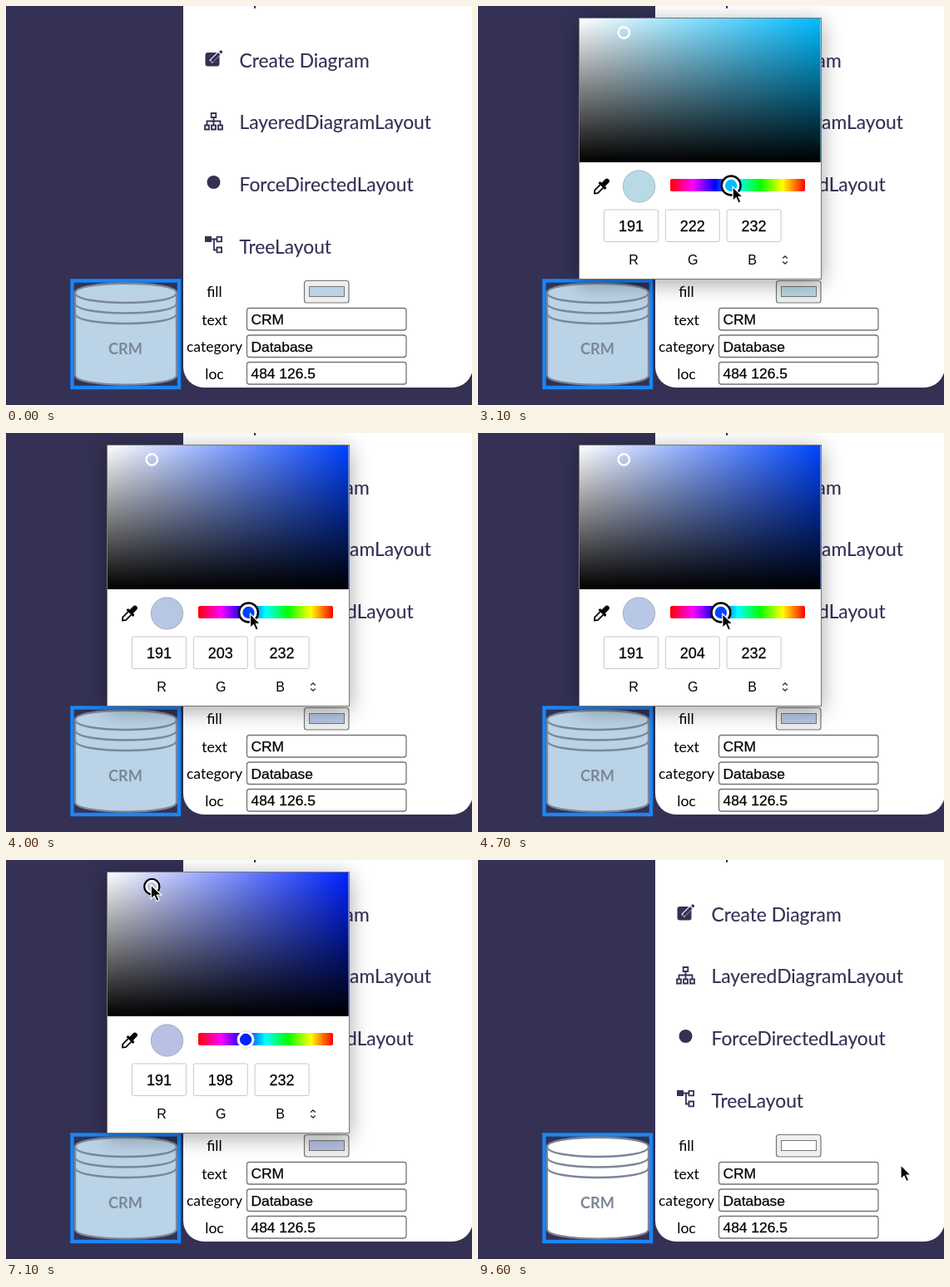
These frames come from a looping animation (560 by 480 pixels, 9900 ms). An HTML page:

```html
<!DOCTYPE html>
<html lang="en">
<head>
<meta charset="utf-8">
<title>Fill colour picker</title>
<style>
  html, body { margin: 0; width: 100%; height: 100%; overflow: hidden; background: #343155; }
  svg { display: block; width: 560px; height: 480px; }
  .menu { font: 22.8px Lato, sans-serif; fill: #343155; stroke: #343155; stroke-width: .15; }
  .label { font: 17.6px Lato, sans-serif; text-anchor: middle; }
  .value, .number { font: 17.4px "Liberation Sans", Arial, sans-serif; stroke: #000; stroke-width: .25; }
  .number { font-size: 18px; text-anchor: middle; }
  .channel { font: 16px "Liberation Sans", Arial, sans-serif; text-anchor: middle; }
  .node { font: bold 18.2px Lato, sans-serif; text-anchor: middle; fill: #7b8798; }
  .field { fill: #fff; stroke: #767676; stroke-width: 1.3; }
  .line { fill: none; stroke: #343155; stroke-width: 1.8; }
  .icon { fill: #343155; }
  #picker { filter: drop-shadow(0 5px 13px rgba(0, 0, 0, .35)); }
</style>
</head>
<body>
<svg viewBox="0 0 560 480">
  <defs>
    <linearGradient id="white"><stop stop-color="#fff"/><stop offset="1" stop-color="#fff" stop-opacity="0"/></linearGradient>
    <linearGradient id="black" x2="0" y2="1"><stop stop-opacity="0"/><stop offset="1"/></linearGradient>
    <linearGradient id="rainbow"></linearGradient>
    <clipPath id="frame"><rect x="121" y="14" width="292" height="315"/></clipPath>
  </defs>

  <rect x="213" y="-40" width="348" height="499" rx="25" fill="#fff"/>
  <path class="icon" d="M298 0h2.200v2.800h-2.200z"/>

  <!-- menu icons -->
  <rect class="icon" x="239.500" y="56" width="17" height="16.500" rx="3"/>
  <path d="M246 67L257.500 55.500" stroke="#fff" stroke-width="5"/>
  <path class="icon" d="M246.500 64.500L255 56L257.500 58.500L249 67L246 67.500ZM256 55L257.500 53.500Q258.500 53 259.500 54Q260.500 55 260 56L258.500 57.500Z"/>
  <path class="line" d="M246.700 129h5.600v5h-5.600zM249.500 134V143M241.500 143V138.500H257.500V143M239 143.500h5v5h-5zM247 143.500h5v5h-5zM255 143.500h5v5h-5z"/>
  <circle class="icon" cx="249.500" cy="212" r="8"/>
  <path class="icon" d="M239 277h8v7h-8z"/>
  <path class="line" d="M247 280.500H253M250 280.500V293.500H253M253.500 277.800h5.600v5.600h-5.600zM253.500 290.500h5.600v5.800h-5.600z"/>

  <g id="form"></g>
  <rect id="button" x="358.500" y="330.500" width="53.500" height="26.500" rx="3" stroke="#767676" stroke-width="1.200"/>
  <rect id="swatch" x="364.500" y="337.500" width="42" height="12" stroke="#777"/>

  <!-- selected database node -->
  <rect x="79.500" y="330.500" width="128.500" height="128.500" fill="none" stroke="#1b85f5" stroke-width="4.400"/>
  <g id="cylinder" stroke="#7b8798" stroke-width="2.300">
    <path d="M83 345C83 330 205 330 205 345V444C205 459.500 83 459.500 83 444Z"/>
    <path d="M83 345C83 361 205 361 205 345M83 357.500C83 373.500 205 373.500 205 357.500M83 370C83 386 205 386 205 370" fill="none"/>
  </g>
  <text class="node" x="143.500" y="418.500">CRM</text>

  <g id="picker">
    <rect x="121.500" y="14.500" width="291" height="314" fill="#fff" stroke="#777"/>
    <g id="shade"></g>
    <g clip-path="url(#frame)"><g id="spot" fill="none">
      <circle id="spotFocus" r="9" stroke="#000" stroke-width="2.500"/>
      <circle r="6.700" stroke="#fff" stroke-width="2.400"/>
    </g></g>

    <g transform="translate(148.500 217) rotate(45)">
      <path d="M-3 -3V-9Q-3 -12 0 -12T3 -9V-3H5.500V0H-5.500V-3Z"/>
      <path d="M-2.600 0V9L0 12L2.600 9V0" fill="#fff" stroke="#000" stroke-width="1.800"/>
    </g>
    <circle id="preview" cx="193.500" cy="217" r="19.300" stroke="#000" stroke-opacity=".2"/>
    <rect x="231" y="208" width="162" height="15" rx="2" fill="url(#rainbow)"/>
    <g id="knob">
      <circle id="knobRing" fill="#fff"/>
      <circle id="knobDot" r="8.500" stroke="#fff" stroke-width="2.600"/>
    </g>
    <g id="channels"></g>
    <path d="M366.300 303.500L369 300.800L371.700 303.500M366.300 307.500L369 310.200L371.700 307.500" fill="none" stroke="#222" stroke-width="1.300"/>
  </g>

  <path id="cursor" d="M0 0V17L4 13.300L6.800 19.500L9.800 18.200L7 12.200H12.400Z" stroke="#fff" stroke-width="1.200"/>
</svg>
<script>
  const LOOP = 9900, STEP = 100;
  const ENTER = 300, OPEN = 1200, HUE_GRAB = 2400, SPOT_GRAB = 7000, CLOSE = 8600;
  const $ = id => document.getElementById(id);
  const set = (id, attrs) => Object.entries(attrs).forEach(([k, v]) => $(id).setAttribute(k, v));
  const show = (id, on) => $(id).style.display = on ? '' : 'none';
  const text = (cls, x, y, s) => `<text class="${cls}" x="${x}" y="${y}">${s}</text>`;

  $('rainbow').innerHTML = ['red', 'magenta', 'blue', 'cyan', 'lime', 'yellow', 'red']
    .map((c, i) => `<stop offset="${i / 6}" stop-color="${c}"/>`).join('');

  $('shade').innerHTML = ['id="base"', 'fill="url(#white)"', 'fill="url(#black)"']
    .map(attr => `<rect x="122" y="15" width="289.5" height="173" ${attr}/>`).join('');

  $('form').innerHTML =
    ['Create Diagram', 'LayeredDiagramLayout', 'ForceDirectedLayout', 'TreeLayout']
      .map((s, i) => text('menu', 280.5, 73.5 + i * 74.8, s)).join('') +
    text('label', 250.5, 350, 'fill') +
    [['text', 'CRM'], ['category', 'Database'], ['loc', '484 126.5']].map(([name, value], i) => {
      const y = 363.5 + i * 32.5;
      return text('label', 250.5, y + 20, name) +
        `<rect class="field" x="289.5" y="${y}" width="191.5" height="26.5" rx="3"/>` +
        text('value', 294.5, y + 19.5, value);
    }).join('');

  $('channels').innerHTML = [...'RGB'].map((c, i) => {
    const x = 184 + i * 73.8;
    return `<rect x="${x - 32.5}" y="245" width="65" height="38.5" rx="2" fill="#fff" stroke="#c8c8c8"/>` +
      text('number', x, 270.5, '') + text('channel', 187 + i * 71.3, 310.5, c);
  }).join('');
  const numbers = document.querySelectorAll('.number');

  // smooth 0 to 1 between two times
  function ramp(t, from, to) {
    const u = Math.max(0, Math.min(1, (t - from) / (to - from)));
    return u * u * (3 - 2 * u);
  }

  function rgb(h, s, v) {
    return [5, 3, 1].map(n => {
      const k = (n + h / 60) % 6;
      return Math.round(255 * v * (1 - s * Math.max(0, Math.min(k, 4 - k, 1))));
    });
  }
  // screen colours are a little deeper than the nominal values
  const css = c => `rgb(${c.map(v => Math.round(255 * (v / 255) ** 1.12))})`;

  function pickedColor(t) {
    const drag = ramp(t, 7200, 7800);
    return {
      h: 206.3 - 11.7 * ramp(t, HUE_GRAB, 3100) + 27.8 * ramp(t, 3100, 4000)
        - 2.9 * ramp(t, 4300, 5400) + 10.3 * ramp(t, 5400, 6200),
      s: .177 * (1 - drag),
      v: .9137 - .0037 * ramp(t, HUE_GRAB, HUE_GRAB + STEP) + .09 * drag
    };
  }

  // the pointer travels from stop to stop and follows what it drags
  function pointer(t, knob, spot) {
    const stops = [
      [[390, 346], ENTER, 1000],
      [[knob.x + 2, knob.y + 1.5], 1500, 2300],
      [[spot.x - 1, spot.y - 2], 6400, SPOT_GRAB],
      [[540, 360], 8100, 8500],
      [[508, 367], CLOSE, 8900]
    ];
    return stops.reduce((at, [to, a, b]) =>
      at.map((p, i) => p + (to[i] - p) * ramp(t, a, b)), [200, 440]);
  }

  const first = pickedColor(0);
  const startFill = css(rgb(first.h, first.s, first.v));

  function draw(now) {
    const t = Math.floor(now % LOOP / STEP) * STEP;
    const { h, s, v } = pickedColor(t);
    const channels = rgb(h, s, v).map(c => Math.min(255, c));
    const fill = t < CLOSE && s ? css(channels) : '#fff', pure = css(rgb(h, 1, 1));
    const open = t >= OPEN && t < CLOSE;
    const onHue = t >= HUE_GRAB && t < SPOT_GRAB;
    const knob = { x: 393.1 - h * .457, y: 216 };
    const spot = { x: 124.5 + s * 287, y: 16.5 + (1 - v) * 172 };

    set('cylinder', { fill: t < CLOSE ? startFill : '#fff' });
    set('button', { fill: open && t < 2000 ? '#e5e5e5' : '#efefef' });
    set('swatch', { fill });
    set('base', { fill: pure });
    set('preview', { fill });
    set('spot', { transform: `translate(${spot.x} ${spot.y})` });
    set('knob', { transform: `translate(${knob.x} ${knob.y})` });
    set('knobDot', { fill: pure });
    set('knobRing', onHue
      ? { r: 11.4, stroke: '#000', 'stroke-width': 2.5 }
      : { r: 10.2, stroke: '#ccc', 'stroke-width': .8 });
    numbers.forEach((n, i) => n.textContent = channels[i]);
    set('cursor', { transform: `translate(${pointer(t, knob, spot)})` });
    show('picker', open);
    show('spotFocus', !onHue);
    show('cursor', t >= ENTER);
  }

  const start = performance.now();
  function tick() {
    draw(performance.now() - start);
    requestAnimationFrame(tick);
  }
  tick();
</script>
</body>
</html>
```
